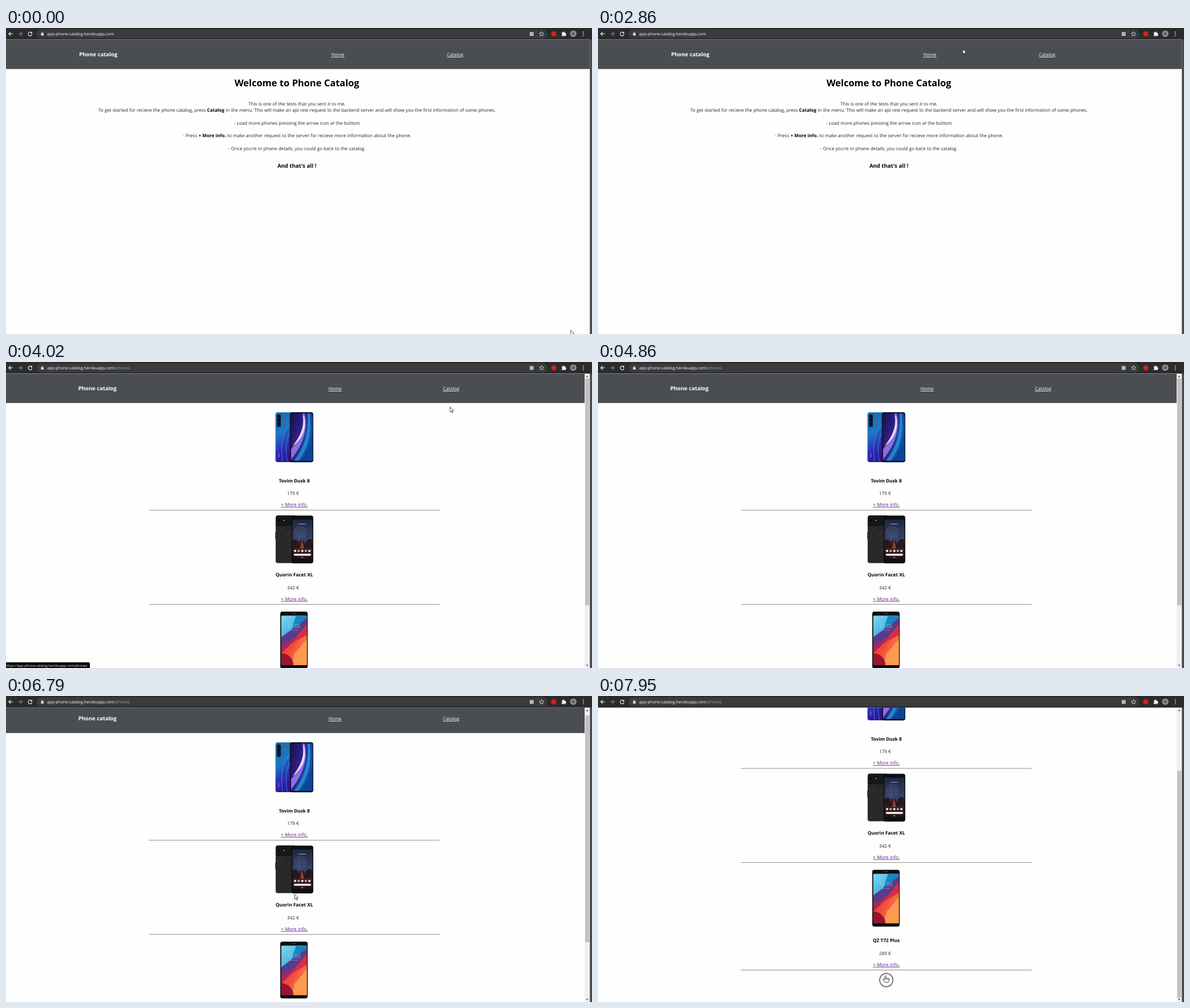
An HTML page that plays this animation: 1034 by 541 pixels, repeating every 8000 ms.

```html
<!DOCTYPE html>
<html lang="en">
<head>
<meta charset="utf-8">
<title>Phone catalog</title>
<style>
  html, body { margin: 0; width: 100%; height: 100%; overflow: hidden; background: #fff; }
  svg { display: block; width: 1034px; height: 541px; }
  text { font: 8.1px "Open Sans", "Noto Sans", sans-serif; word-spacing: .2px;
         text-rendering: geometricPrecision; fill: #1d2125; }
  .mid { text-anchor: middle; }
  .bold, .brand, .h1, .h3 { font-weight: 700; fill: #000; }
  .h1 { font-size: 16.5px; }
  .h3 { font-size: 9.55px; }
  .brand { font-size: 9.55px; fill: #fff; }
  .nav { font-size: 8.2px; fill: #fff; text-decoration: underline; }
  .name { font-size: 8.25px; }
  .more { font-size: 8.3px; fill: #551a8b; text-decoration: underline; }
  .url { font-size: 7.2px; fill: #fff; word-spacing: 0; }
  .url .path { fill: #9aa0a6; }
  .status { font-size: 6.1px; fill: #fff; word-spacing: 0; }
  .clock { font-size: 9px; font-weight: 300; fill: #cfe4f2; }
  .date { font-size: 2.6px; fill: #cfe4f2; }
  .icon { fill: none; stroke: #e8eaed; stroke-width: 1.2; }
</style>
</head>
<body>
<svg viewBox="0 0 1034 541" xmlns="http://www.w3.org/2000/svg">
  <defs>
    <clipPath id="view"><rect y="20.5" width="1030" height="521"/></clipPath>
    <clipPath id="screenA"><rect x="502.5" y="91" width="38.5" height="83.5" rx="2.5"/></clipPath>
    <clipPath id="screenC"><rect x="485.8" y="448.5" width="45" height="87.5" rx="1.5"/></clipPath>
    <linearGradient id="backA" x2=".35" y2="1">
      <stop offset="0" stop-color="#1a6a9c"/><stop offset=".45" stop-color="#1c78c4"/>
      <stop offset=".75" stop-color="#2c2fb8"/><stop offset="1" stop-color="#35109c"/>
    </linearGradient>
    <linearGradient id="wallA" x2="1" y2=".6">
      <stop offset="0" stop-color="#15104e"/><stop offset=".45" stop-color="#2f1f86"/>
      <stop offset=".75" stop-color="#16489f"/><stop offset="1" stop-color="#0d5fae"/>
    </linearGradient>
    <linearGradient id="wallB" x2="0" y2="1">
      <stop offset="0" stop-color="#1f2742"/><stop offset=".5" stop-color="#35426c"/>
      <stop offset=".68" stop-color="#3a2428"/><stop offset="1" stop-color="#1d1214"/>
    </linearGradient>
    <linearGradient id="skyC" x2="1" y2="1">
      <stop offset="0" stop-color="#7fdcf2"/><stop offset="1" stop-color="#1a8fd0"/>
    </linearGradient>
    <linearGradient id="redC" x2="1" y2="1">
      <stop offset="0" stop-color="#d8304e"/><stop offset=".5" stop-color="#f0483c"/>
      <stop offset="1" stop-color="#fba04c"/>
    </linearGradient>
    <radialGradient id="face"><stop offset="0" stop-color="#4a4648"/><stop offset="1" stop-color="#a9a5a6"/></radialGradient>
  </defs>

  <rect width="1034" height="541" fill="#fefefe"/>
  <g clip-path="url(#view)">
    <g id="plainHead"></g>
    <g id="home">
      <text class="mid h1" x="513.3" y="102.8">Welcome to Phone Catalog</text>
      <text class="mid" x="513.4" y="136.7">This is one of the tests that you sent it to me.</text>
      <text class="mid" x="513.4" y="148.1">To get started for recieve the phone catalog, press <tspan class="bold">Catalog</tspan> in the menu. This will make an api rest request to the backend server and will show you the first information of some phones.</text>
      <text class="mid" x="513.4" y="170.8">- Load more phones pressing the arrow icon at the bottom</text>
      <text class="mid" x="513.4" y="193.4">- Press <tspan class="bold">+ More info.</tspan> to make another request to the server for recieve more information about the phone.</text>
      <text class="mid" x="513.4" y="216">- Once you're in phone details, you could go back to the catalog.</text>
      <text class="mid h3" x="513.4" y="247">And that's all !</text>
    </g>
    <text id="loading" class="mid" x="513.3" y="90.5">Loading catalog...</text>
    <g id="catalog">
      <g id="page"></g>
      <rect x="1021" y="20.5" width="9" height="521" fill="#f1f1f1"/>
      <path d="M1023.2 26.6h4.6l-2.3-2.6zM1023.2 535.4h4.6l-2.3 2.6z" fill="#555"/>
      <rect id="thumb" x="1022" y="29" width="7.2" height="401" fill="#c1c1c1"/>
    </g>
  </g>
  <rect x="1030.2" y="20" width="4" height="521" fill="#4a4a4c"/>

  <g id="browser">
    <rect width="1034" height="20.5" fill="#2b2b2c"/>
    <rect x="54" y="2.3" width="901" height="16" rx="8" fill="#3b3b3c"/>
    <path class="icon" d="M12 10.3H5M8.3 6.8 4.8 10.3 8.3 13.8"/>
    <path class="icon" style="stroke:#7d7f82" d="M21.5 10.3h7M25.2 6.8l3.5 3.5-3.5 3.5"/>
    <path class="icon" d="M45 8.2A3.3 3.3 0 1 0 45.9 11"/>
    <path d="M46.2 6.3v3.4h-3.4z" fill="#e8eaed"/>
    <rect x="61.8" y="9.3" width="4.6" height="4" rx=".5" fill="#e8eaed"/>
    <path class="icon" style="stroke-width:.8" d="M62.8 9.5V8.6a1.3 1.3 0 0 1 2.6 0v.9"/>
    <text class="url" x="72.5" y="12.9">app-phone-catalog.herokuapp.com<tspan id="path" class="path"></tspan></text>
    <rect x="924" y="7" width="7" height="7" rx="1" fill="#b4b6b9"/>
    <path class="icon" style="stroke-width:.8" d="M945 6.3l1.2 2.6 2.8.3-2.1 1.9.6 2.8-2.5-1.4-2.5 1.4.6-2.8-2.1-1.9 2.8-.3z"/>
    <circle cx="966.5" cy="10.4" r="4.6" fill="#d3201f"/>
    <path d="M980.6 8h2a1.3 1.3 0 1 1 2.5 0h2v2.1a1.3 1.3 0 1 1 0 2.5v1.8h-2.2a1.2 1.2 0 0 0-2.3 0h-2v-2.1a1.2 1.2 0 0 0 0-2.3z" fill="#f1f3f4"/>
    <circle cx="1001" cy="10" r="5.6" fill="url(#face)"/>
    <g fill="#e8eaed"><circle cx="1018.6" cy="7.2" r=".9"/><circle cx="1018.6" cy="10.4" r=".9"/><circle cx="1018.6" cy="13.6" r=".9"/></g>
  </g>

  <g id="status">
    <path id="bubble"/>
    <text id="link" class="status" x="-.8" y="538.6"></text>
  </g>

  <g id="cursor" fill="#fff" stroke="#111" stroke-width=".75" stroke-linejoin="round">
    <path id="arrow" d="M.3.4V9.3L2.4 7.4 3.8 10.6 5.2 10 3.8 6.9H6.6Z"/>
    <path id="hand" d="M-.9 7.6V1.2A.95.95 0 0 1 1 1.2V4.6Q2.3 3.9 2.7 4.9 4 4.4 4.4 5.4 6.2 5 6.2 6.6V8.6Q6.2 10.4 5 12.4H-.6Q-1.6 10.4-3.6 8.3-4.2 7.1-3.1 6.7-2.2 6.5-.9 7.6ZM1 4.8V6.7M2.7 5.2V7M4.4 5.6V7.2"/>
  </g>
</svg>

<script>
const $ = id => document.getElementById(id);
const CENTER = 508.7;

const header = (width, brand, home, catalog) => `
  <rect y="20.5" width="${width}" height="52" fill="#4a4e52"/>
  <text class="brand" x="${brand}" y="50.4">Phone catalog</text>
  <text class="nav" x="${home}" y="50.2">Home</text>
  <text class="nav" x="${catalog}" y="50.2">Catalog</text>`;

const item = (y, name, price) => `
  <text class="mid bold name" x="${CENTER}" y="${y}">${name}</text>
  <text class="mid" x="506.5" y="${y + 22.6}">${price} €</text>
  <text class="mid more" x="${CENTER}" y="${y + 42.6}">+ More info.</text>
  <rect x="252" y="${y + 48.8}" width="513" height="1" fill="#8c8c8c"/>`;

const bluePhone = `
  <rect x="475.5" y="89" width="32" height="88" rx="4" fill="url(#backA)"/>
  <path d="M500 112Q482 128 488 176M501 125Q491 140 496 176" fill="none" stroke="#39a5e6" stroke-width="1.3" opacity=".6"/>
  <rect x="478" y="92.5" width="7" height="22.5" rx="3.2" fill="#101a38"/>
  <g fill="#060a18"><circle cx="481.5" cy="96.5" r="2"/><circle cx="481.5" cy="103" r="2"/><circle cx="481.5" cy="109.5" r="2"/></g>
  <rect x="480.8" y="161" width="1.2" height="8" fill="#aab8f0" opacity=".6"/>
  <rect x="500.8" y="88.8" width="41.4" height="88.4" rx="4" fill="#0d1024"/>
  <g clip-path="url(#screenA)">
    <rect x="502" y="90" width="40" height="86" fill="url(#wallA)"/>
    <path d="M523 91Q530 124 503 154V172Q536 132 527 91Z" fill="#8d6ee0"/>
    <path d="M524 95Q528 122 505 149 534 128 526 95Z" fill="#e6d8fa"/>
    <path d="M532 91Q536 140 508 175H516Q542 140 536 91Z" fill="#259be0" opacity=".75"/>
    <path d="M541 112Q540 150 520 175H541Z" fill="#0b3f8f" opacity=".8"/>
  </g>
  <circle cx="521.5" cy="92" r="1" fill="#0d1024"/>`;

const spark = (_, i) => {
  const a = i * 2.4, r = 1.75 * Math.sqrt(i);
  const color = ["#8fb4ee", "#c9d6f5", "#b7a36a"][i % 3];
  return `<circle cx="${519 + r * Math.cos(a)}" cy="${301 + r * Math.sin(a)}" r=".55" fill="${color}"/>`;
};
const dock = (color, i) => `<circle cx="${510.2 + i * 6.3}" cy="334" r="2.1" fill="${color}"/>`;

const blackPhone = `
  <rect x="475.8" y="271.3" width="36" height="84.3" rx="4" fill="#29292b"/>
  <path d="M476 290V275Q476 271.5 480 271.5H508V290Z" fill="#171719"/>
  <rect x="475.3" y="301" width="1" height="12" fill="#111"/>
  <circle cx="481.5" cy="280" r="1.8" fill="#050506"/><circle cx="490.5" cy="280" r="1.1" fill="#bbb"/>
  <circle cx="496" cy="295" r="4" fill="#222224" stroke="#37373a" stroke-width=".5"/>
  <rect x="503.8" y="271.6" width="38.4" height="84.4" rx="4" fill="#0e0e10"/>
  <rect x="505.6" y="278.5" width="35" height="70" fill="url(#wallB)"/>
  <path d="M505.6 329V316Q512 309 517 322L519 316H525L527 322Q533 308 540.6 315V329Z" fill="#2a171b"/>
  <path d="M519 330L522 313 526 330Z" fill="#8f4034"/>
  ${Array.from({ length: 42 }, spark).join("")}
  <rect x="516" y="286" width="13" height="1" fill="#c5cbe0" opacity=".8"/>
  ${["#eee", "#d9a49a", "#e8e8e8", "#e59178", "#dfe9e0"].map(dock).join("")}
  <rect x="507.8" y="339" width="30.6" height="3.6" rx="1.8" fill="#f2f2f2"/>
  <rect x="521" y="345.2" width="3.6" height="1" rx=".5" fill="#ddd"/>`;

const redPhone = `
  <rect x="483.8" y="441.2" width="48.6" height="100.6" rx="4" fill="#222329"/>
  <rect x="484.7" y="442" width="46.8" height="99" rx="3.4" fill="#0d0d10"/>
  <rect x="504" y="444.2" width="8" height="1" rx=".5" fill="#555"/>
  <g clip-path="url(#screenC)">
    <rect x="485" y="448" width="46" height="88" fill="url(#redC)"/>
    <path d="M485 448H531V454L485 489Z" fill="url(#skyC)"/>
    <path d="M512 448H531V456L502 478Z" fill="#1585c4"/>
    <path d="M485 487L531 453V473L485 505Z" fill="#5a3a8c"/>
    <path d="M531 463V482L500 500Z" fill="#d52e45"/>
    <path d="M485 500L513 488 485 516Z" fill="#a8265c"/>
    <path d="M509 516L531 490V536H505Z" fill="#fb9a50"/>
    <circle cx="486" cy="536" r="21" fill="#a81830"/>
    <path d="M485 515A21 21 0 0 1 507 536L485 536Z" fill="#8f1230" opacity=".6"/>
  </g>
  <text class="mid clock" x="508.2" y="470.2">12:00</text>
  <text class="mid date" x="508.2" y="474.6">Sat, 10 June</text>`;

$("plainHead").innerHTML = header(1030.2, 129, 574, 778);
$("page").innerHTML = header(1021, 127.6, 569, 771)
  + bluePhone + item(212.7, "Tovim Dusk 8", 179)
  + blackPhone + item(379.1, "Quorin Facet XL", 342)
  + redPhone + item(569.2, "QZ T72 Plus", 289)
  + `<g fill="none" stroke="#77787b" stroke-width="2">
       <circle cx="${CENTER}" cy="636.2" r="11.7"/><path d="M503 634l5.7 5.5 5.7-5.5"/></g>`;

const LOOP = 8000, TICK = 77.17;
const SITE = "https://app-phone-catalog.herokuapp.com";

// tick, x, y of the pointer tip
const route = [
  [0, 996, 534], [1, 915, 460], [2, 760, 320], [3, 684, 261], [10, 684, 261],
  [14, 650, 195], [18, 594, 82], [21, 577.5, 50], [22, 578, 49], [23, 578, 49],
  [25, 579, 46], [27, 579, 46], [29, 576, 41], [33, 576, 41], [36, 612, 37],
  [40, 738, 36], [44, 790, 42], [49, 790, 42], [54, 779, 104], [57, 731, 170],
  [58, 731, 170], [59, 720, 174], [61, 480, 90], [62, 236, 4], [63, 200, -20],
  [65, 80, -20], [66, 82, 4], [68, 130, 45], [71, 420, 63], [74, 830, 35],
  [76, 940, 14], [77, 938, 9], [79, 720, 120], [81, 400, 270], [82, 365, 318],
  [84, 509, 350], [96, 509, 350], [98, 510, 385], [101, 508, 478], [103, 507, 494]
];
const scrolls = [0, 7, 38, 70, 97, 115, 126, 132, 134];

const within = (n, ...spans) => spans.some(([a, b]) => n >= a && n <= b);
const show = (id, on) => $(id).style.display = on ? "" : "none";

function pointAt(n) {
  const i = Math.max(1, route.findIndex(p => p[0] >= n));
  const [a, x0, y0] = route[i - 1], [b, x1, y1] = route[i];
  const k = (n - a) / (b - a);
  return [x0 + (x1 - x0) * k, y0 + (y1 - y0) * k];
}

function draw(time) {
  const n = Math.min(103, Math.floor(time / TICK + 0.17));
  const loaded = n >= 50, clicked = n >= 45;

  show("plainHead", !loaded);
  show("home", !clicked);
  show("loading", clicked && !loaded);
  show("catalog", loaded);
  $("path").textContent = clicked ? "/phones" : "";

  const scroll = scrolls[Math.min(8, Math.max(0, n - 87))];
  $("page").setAttribute("transform", `translate(0 ${-scroll})`);
  $("thumb").setAttribute("y", 29 + scroll * 0.772);

  const overCatalog = within(n, [43, 52]);
  const width = overCatalog ? 148 : 124;
  show("status", overCatalog || within(n, [24, 36]));
  $("link").textContent = SITE + (overCatalog ? "/phones" : "");
  $("bubble").setAttribute("d", `M0 531H${width - 2}q2 0 2 2V541H0Z`);

  const hand = within(n, [20, 35], [43, 50], [102, 103]);
  show("hand", hand);
  show("arrow", !hand);
  $("cursor").setAttribute("transform", `translate(${pointAt(n)})`);
}

const start = performance.now();
function frame() {
  draw((performance.now() - start) % LOOP);
  requestAnimationFrame(frame);
}
frame();
</script>
</body>
</html>
```
